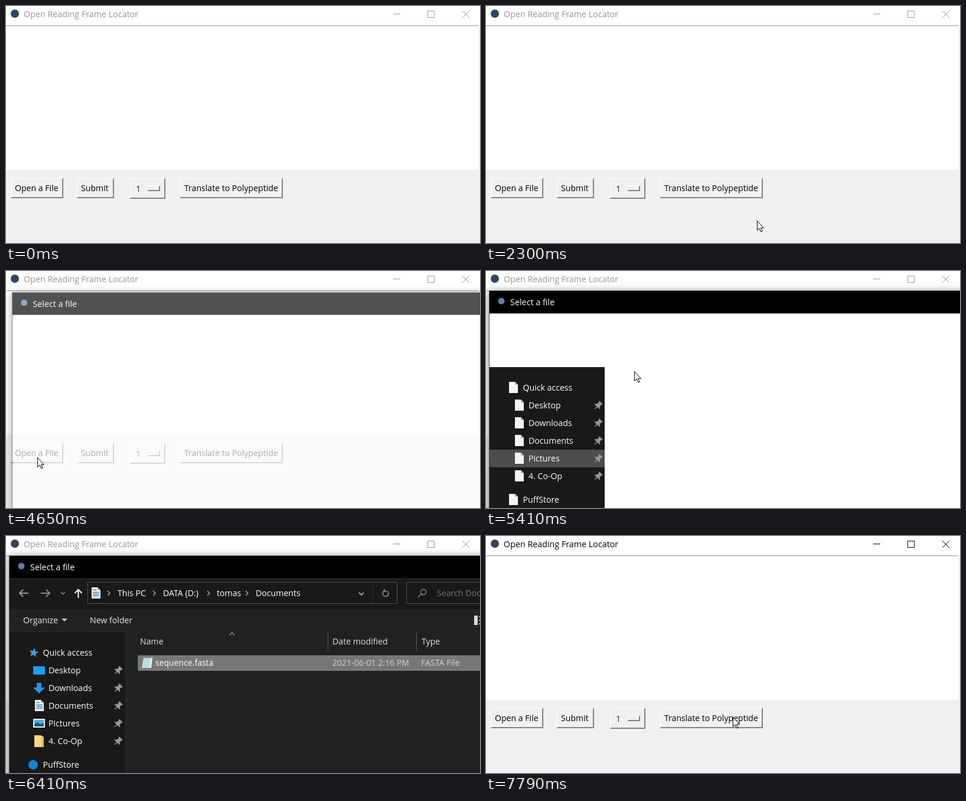
An HTML page for the animation above (8 s loop, 803 by 402 pixels).

```html
<!DOCTYPE html>
<html lang="en">
<head>
<meta charset="utf-8">
<title>Open Reading Frame Locator</title>
<style>
  html, body { margin: 0; width: 100%; height: 100%; overflow: hidden; background: #fff; }
  svg { display: block; width: 100%; height: 100%; }
  text { font-family: "Open Sans", "Noto Sans", sans-serif; white-space: pre; }
  #frame { filter: drop-shadow(0 2px 7px rgba(0, 0, 0, .5)); }
  #crumbs { font-weight: 500; }
</style>
</head>
<body>
<svg id="stage" viewBox="0 0 803 402"></svg>
<script>
const LOOP = 8000;
const stage = document.getElementById('stage');

// Drawing helpers, each returning SVG markup
const rect = (x, y, w, h, fill, more = '') =>
  `<rect x="${x}" y="${y}" width="${w}" height="${h}" fill="${fill}" ${more}/>`;
const shape = (d, fill) => `<path d="${d}" fill="${fill}"/>`;
const line = (d, stroke, w = 1) => `<path d="${d}" fill="none" stroke="${stroke}" stroke-width="${w}"/>`;
const text = (x, y, s, fill = '#fff', size = 14.15, more = '') =>
  `<text x="${x}" y="${y}" fill="${fill}" font-size="${size}" ${more}>${s}</text>`;
const dot = (x, y, r, fill, more = '') => `<circle cx="${x}" cy="${y}" r="${r}" fill="${fill}" ${more}/>`;
const group = (id, ...parts) => `<g id="${id}">${parts.join('')}</g>`;

const bevel = (x, y, w, h, sunken) => {
  const [light, dark, mid] = sunken ? ['#696969', '#fff', '#f0f0f0'] : ['#fff', '#757575', '#909090'];
  return rect(x, y, w, h, dark) + rect(x, y, w - 1, h - 1, light) +
    rect(x + 1, y + 1, w - 2, h - 2, mid) + rect(x + 1, y + 1, w - 3, h - 3, '#f0f0f0');
};
const button = (x, w, label, sunken = false) =>
  bevel(x, 292, w, 34, sunken) + text(x + 7 + sunken, 314 + sunken, label, '#000', 14.1);

const page = (x, y, lined) =>
  shape(`M${x} ${y}h10l5 5v14h-15z`, '#f4f4f4') + shape(`M${x + 10} ${y}v5h5z`, '#b5b5b5') +
  (lined ? line(`M${x + 2} ${y + 4.5}h6m-6 4h11m-11 3h11m-11 3h11`, '#3e7fa8', 1.4) : '');
const pin = y => `<g transform="translate(190 ${y}) rotate(45)">` +
  shape('M-4-7h8v2h-1v4l3 3v1h-12v-1l3-3v-4h-1z', '#8e9a9e') + line('M0 2v6', '#8e9a9e', 1.4) + '</g>';
const chevron = x => line(`M${x - 2} 93l4 4-4 4`, '#a0a0a0', 1.6);

const places = ['Desktop', 'Downloads', 'Documents', 'Pictures', '4. Co-Op'];
const rowY = i => 228 + 30 * i;

const mainWindow =
  rect(0, 0, 803, 402, '#fff') +
  rect(0, 33, 800, 1, '#979797') +
  rect(801, 34, 2, 244, '#f0f0f0') +
  rect(0, 278, 803, 124, '#f0f0f0') +
  dot(15, 13, 7, '#2f4560') +
  group('caption',
    text(30, 19, 'Open Reading Frame Locator', 'currentColor', 14.3),
    line('M656 13.5h12M714.5 8.5h11v11h-11zM773 8l12 12m0-12l-12 12', 'currentColor')) +
  button(8, 89, 'Open a File') +
  button(120, 63, 'Submit') +
  bevel(210, 292, 60, 35) + text(220, 315, '1', '#402a20', 14.6) +
  bevel(240, 305, 21, 9) +
  button(295, 174, 'Translate to Polypeptide') +
  group('pressed', button(8, 89, 'Open a File', true));

const sidebar = group('sidebar',
  rect(6, 163, 195, 400, '#191919'),
  group('hover', rect(6, 303, 195, 30, '#4d4d4d')),
  text(62.5, 203, 'Quick access'),
  places.map((s, i) => text(72, rowY(i) + 5, s) + pin(rowY(i))).join(''),
  text(62.5, 393, 'PuffStore'));

const blankIcons = group('blankIcons',
  page(39, 188), places.map((s, i) => page(49, rowY(i) - 10)).join(''), page(39, 378));

const star = Array.from({ length: 10 }, (_, i) => {
  const a = i * Math.PI / 5 - 1.4, r = i % 2 ? 3.6 : 8.5;
  return `${47 + r * Math.cos(a)} ${198 + r * Math.sin(a)}`;
}).join('L');

const icons = group('icons',
  shape(`M${star}z`, '#3b9be8'),
  rect(46, 221, 20, 14, '#18a0f5'),
  shape('M52 249h8v8h6l-10 10-10-10h6z', '#2f8fdd'),
  page(49, 278, true),
  rect(46, 310, 20, 15, '#eef3f6'), rect(48, 312, 16, 11, '#4fb0e0'),
  shape('M48 323v-4l5-3 5 3 6-2v6z', '#25556e'),
  shape('M48 338h11l5 3v17h-16z', '#f5d88a'), rect(60, 341, 4, 17, '#e3bd62'),
  dot(46, 388, 8, '#1583d2'));

const chrome = group('chrome',
  rect(6, 72, 910, 53, '#191919'), rect(6, 72, 910, 1, '#383838'),
  rect(6, 124, 910, 39, '#202222'),
  rect(6, 163, 198, 393, '#191919'),
  rect(204, 163, 712, 393, '#202222'),
  rect(6, 162, 198, 1, '#2c2c2c'), rect(203, 163, 1, 393, '#303030'),
  line('M38 97h-15m6-6l-6 6 6 6', '#9a9a9a', 2),
  line('M59 97h15m-6-6l6 6-6 6', '#8a8a8a', 2),
  line('M93 95l3.500 3.500 3.500-3.500', '#8a8a8a', 1.6),
  line('M122.500 105v-14m-6 6l6-6 6 6', '#fff', 2),
  rect(138.5, 78.5, 524, 36, 'none', 'stroke="#535353"'),
  rect(621, 79, 1, 35, '#333'),
  page(145, 87, true),
  [174, 251, 343, 408].map(chevron).join(''),
  group('crumbs',
    text(189, 102, 'This PC'), text(266, 102, 'DATA (D:)'),
    text(357, 102, 'tomas'), text(423, 102, 'Documents')),
  line('M598 96l4 4 4-4', '#a0a0a0', 2),
  line('M646 93.500a5 5 0 1 1-5 -.500m0-3v4h4', '#999', 1.5),
  rect(678.5, 78.5, 226, 36, 'none', 'stroke="#535353"'),
  dot(707, 95, 4.5, 'none', 'stroke="#8a8a8a" stroke-width="1.4"'),
  line('M704 98l-6 6', '#8a8a8a', 1.5),
  text(730, 102, 'Search Documents', '#777'),
  text(29, 148, 'Organize', '#e8e8e8'), shape('M94 140h10l-5 5z', '#c8c8c8'),
  text(142, 148, 'New folder', '#e8e8e8'),
  rect(793, 135, 6, 16, '#d8d8d8'), line('M801 137h14m-14 6h14m-14 6h14', '#aaa', 2));

const list = group('list',
  line('M379 168l4-4 4 4', '#999', 1.3),
  rect(545, 163, 1, 32, '#5c5c5c'), rect(695, 163, 1, 32, '#5c5c5c'),
  text(227, 184, 'Name', '#dedede'), text(553, 184, 'Date modified', '#dedede'),
  text(704, 184, 'Type', '#dedede'),
  rect(224, 203, 680, 25, 'none', 'id="row"'),
  shape('M233 206h14l-2 18h-15z', '#b9dbe3'), shape('M245 206h3l-2 18h-3z', '#f2f2f2'),
  line('M234 206h13', '#7b8b90', 2),
  text(253, 220, 'sequence.fasta', '#fff', 14),
  text(553, 220, '2021-06-01 2:16 PM', '#d0d0d0', 14.1),
  text(703, 220, 'FASTA File', '#d0d0d0'));

const dialog = group('dialog',
  rect(5, 33, 912, 524, '#555', 'id="frame"'),
  rect(6, 34, 910, 522, '#fff'),
  rect(6, 34, 910, 38, '#000'),
  dot(26, 51, 5.5, '#5f7fa6', 'id="badge"'),
  text(41, 58, 'Select a file', '#fff', 14.4, 'id="heading"'),
  chrome, sidebar, blankIcons, icons, list);

const pointer = group('pointer',
  '<path d="M.5.5v16l3.700-3.500 2.600 6 2.400-1-2.600-5.500h4.900z" fill="#fff" stroke="#000"/>');

stage.innerHTML = mainWindow + dialog + pointer;
const el = id => document.getElementById(id);
const show = (id, on) => { el(id).style.display = on ? '' : 'none'; };

// Pointer moves: start, end, number of steps, target x, target y
const moves = [
  [380, 380, 1, 661, 386], [450, 590, 3, 388, 367],
  [990, 1680, 10, 129, 366], [1830, 1990, 3, 475, 361],
  [2300, 2300, 1, 459, 364], [2380, 3090, 10, 44, 316],
  [3310, 3390, 2, 42, 305], [4170, 4320, 3, 53, 316],
  [5030, 5410, 6, 251, 170], [5780, 6030, 4, 300, 217],
  [6280, 6410, 3, 640, 420],
  [7280, 7280, 1, 434, 385], [7350, 7560, 4, 416, 265],
  [7710, 7790, 2, 418, 307]
];
function pointerAt(t) {
  let x = 661, y = 420;
  for (const [start, end, n, toX, toY] of moves) {
    if (t < start) break;
    const step = n < 2 ? 1 : Math.floor((t - start) / (end - start) * (n - 1) + .01) + 1;
    const k = Math.min(1, step / n);
    x += (toX - x) * k;
    y += (toY - y) * k;
  }
  return [Math.round(x), Math.round(y)];
}

// Values held from a given time on
const heldAt = (steps, t) => steps.filter(s => s[0] <= t).pop()[1];
const fades = [[0, 0], [4570, .35], [4650, .68], [4720, .9], [4800, 1],
  [6870, .95], [6950, .65], [7040, .31], [7100, 0]];
const rowFills = [[0, 'none'], [6030, '#4d4d4d'], [6210, '#777'], [6870, '#333']];

function draw(now) {
  const t = now % LOOP;
  const closing = t >= 6870;
  const active = closing || (t >= 3090 && t < 3390);
  el('caption').style.color = active ? '#000' : '#969696';
  show('pressed', t >= 3090 && t < 3310);

  const alpha = heldAt(fades, t);
  const scale = 1 - (closing ? .045 : .034) * (1 - alpha);
  show('dialog', alpha > 0);
  el('dialog').setAttribute('opacity', alpha);
  el('dialog').setAttribute('transform', `translate(461 295) scale(${scale}) translate(-461 -295)`);
  el('heading').setAttribute('x', closing ? 16 : 41);
  show('badge', !closing);

  const loaded = t >= 5480;
  show('sidebar', t >= 4950);
  show('hover', !loaded);
  show('blankIcons', t >= 4950 && !loaded);
  show('icons', loaded);
  show('chrome', loaded);
  show('list', t >= 5780);
  el('row').setAttribute('fill', heldAt(rowFills, t));
  el('row').setAttribute('stroke', t >= 6210 && !closing ? '#8c8c8c' : 'none');

  el('pointer').setAttribute('transform', `translate(${pointerAt(t)})`);
  requestAnimationFrame(draw);
}
requestAnimationFrame(draw);
</script>
</body>
</html>
```
